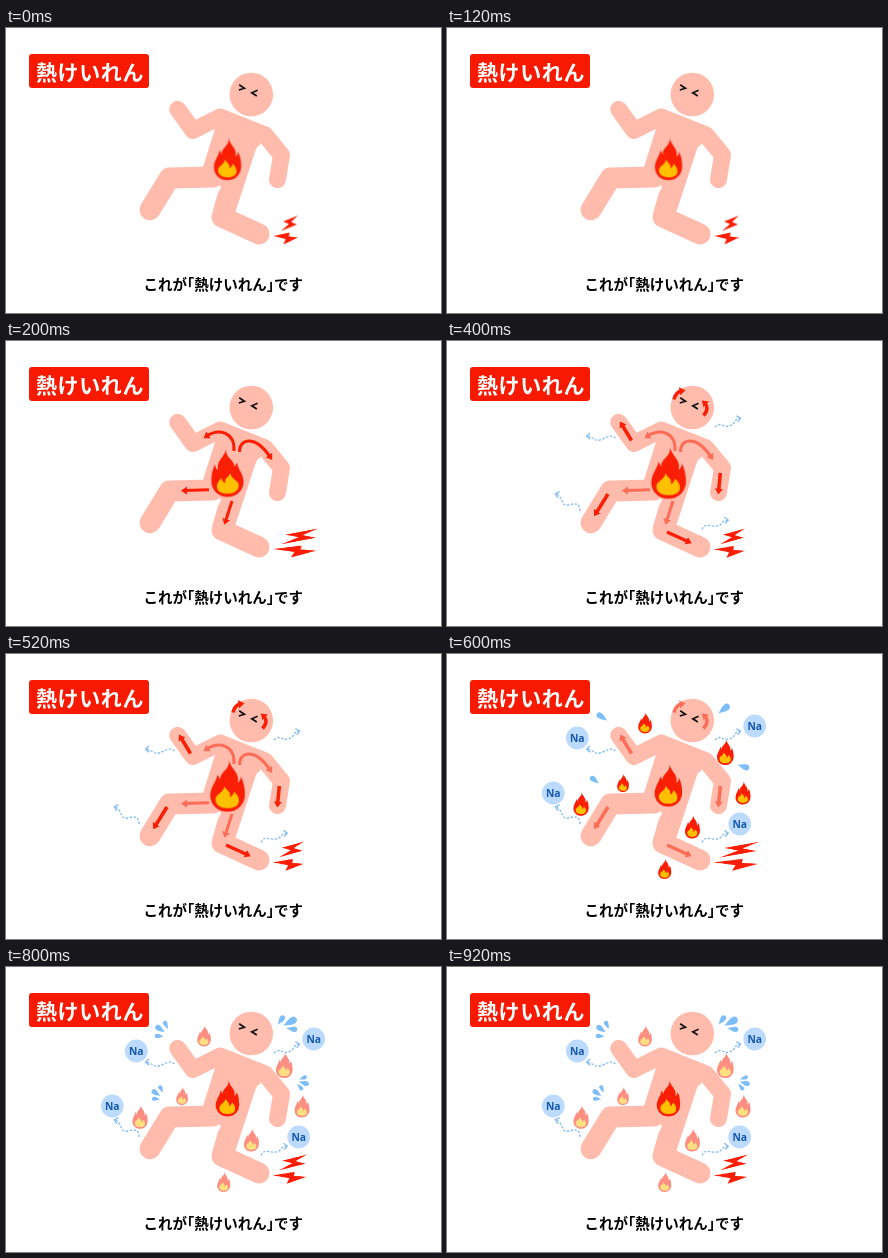
An HTML page that plays this animation: 435x285 px, repeating every 1000 ms.

```html
<!DOCTYPE html>
<html lang="ja">
<head>
<meta charset="utf-8">
<title>熱けいれん</title>
<style>
  html, body { margin: 0; width: 100%; height: 100%; overflow: hidden; background: #fff; }
  svg { display: block; width: 435px; height: 285px; }
  text { font-family: "Noto Sans CJK JP", "Noto Sans CJK", sans-serif; font-weight: 700; }
  .na text { font: 700 10.3px "Noto Sans", "Open Sans", sans-serif; fill: #1457ad; text-anchor: middle; }
  .caption { font-size: 14.5px; font-feature-settings: "halt"; }
  .skin { fill: none; stroke: #ffbcac; stroke-linecap: round; stroke-linejoin: round; }
  .arrows { fill: none; stroke: #fa1e05; stroke-width: 3; }
  .waves { fill: none; stroke: #85bcf3; stroke-width: 1.3; }
  .waves path { stroke-dasharray: 2.4 1.5; }
  .bolt { fill: #fa1e05; }
  .drops { fill: #7dbdfa; }

  .core, .limbs, .waves, .sodium, .sparks, .one, .three, .heart, .bolt {
    animation: 1s step-end infinite;
  }
  .core { animation-name: core; }
  .limbs { animation-name: limbs; }
  .waves { animation-name: waves; }
  .sodium { animation-name: sodium; }
  .sparks { animation-name: sparks; }
  .one { animation-name: one; }
  .three { animation-name: three; }
  .heart { animation-name: heart; }
  .top { animation-name: top; }
  .low { animation-name: low; }

  @keyframes core { 0%, 60%, 100% { opacity: 0 } 20% { opacity: 1 } 40% { opacity: .5 } }
  @keyframes limbs { 0%, 80%, 100% { opacity: 0 } 40% { opacity: 1 } 60% { opacity: .5 } }
  @keyframes waves { 0%, 100% { opacity: 0 } 40% { opacity: 1 } }
  @keyframes sodium { 0%, 100% { opacity: 0 } 60% { opacity: 1 } }
  @keyframes sparks { 0%, 100% { opacity: 0 } 60% { opacity: 1 } 80% { opacity: .5 } }
  @keyframes one { 0%, 80%, 100% { opacity: 0 } 60% { opacity: 1 } }
  @keyframes three { 0%, 100% { opacity: 0 } 80% { opacity: 1 } }
  @keyframes heart {
    0%, 100% { transform: translate(221.5px, 131.3px) scale(1) }
    20% { transform: translate(221.5px, 132px) scale(-1.18, 1.14) }
    40% { transform: translate(221.5px, 132px) scale(1.27, 1.23) }
    60% { transform: translate(221.3px, 131.5px) scale(1.01) }
    80% { transform: translate(221.5px, 131.5px) scale(.86) }
  }
  @keyframes top {
    0%, 100% { transform: translate(275px, 187.5px) }
    20% { transform: translate(275px, 187.5px) scale(2.18, 1.02) }
    40% { transform: translate(273px, 187.5px) scale(1.47, 1.02) }
    60% { transform: translate(272.5px, 187.8px) scale(2.32, 1.02) }
    80% { transform: translate(273px, 187.5px) scale(1.65, 1.02) }
  }
  @keyframes low {
    0%, 100% { transform: translate(267.5px, 204px) }
    20% { transform: translate(267px, 204px) scale(1.78, 1) }
    40% { transform: translate(267px, 204.3px) scale(1.25, 1) }
    60% { transform: translate(267px, 204.3px) scale(1.8, 1) }
    80% { transform: translate(267px, 204.3px) scale(1.36, 1) }
  }
</style>
</head>
<body>
<svg viewBox="0 0 435 285">
  <defs>
    <marker id="head" markerUnits="userSpaceOnUse" markerWidth="10" markerHeight="10"
            viewBox="0 -5 10 10" refX="3" orient="auto">
      <path d="M0 -4L6 0L0 4Z" fill="#fa1e05" stroke="none"/>
    </marker>
    <marker id="tip" markerUnits="userSpaceOnUse" markerWidth="8" markerHeight="8"
            viewBox="-6 -4 8 8" refX="0" orient="auto">
      <path d="M-3.6 -3.2L0 0L-3.6 3.2" fill="none" stroke="#85bcf3" stroke-width="1.3"
            style="stroke-dasharray:none"/>
    </marker>
    <g id="flame">
      <path fill="#fa1e05" d="M1 -21.5C3 -13 10 -11 8 -2.5C9.8 -4 10.6 -6 10.3 -8C13 -3 13.7 2 13.7 7C13.7 15 8 21 0 21C-8 21 -13.6 15 -13.6 8C-13.6 1 -9 -3 -8 -9C-6.6 -7.5 -6 -5.5 -5.8 -3.5C-7 -12 2.5 -13 1 -21.5Z"/>
      <path fill="#ffc000" d="M-2.5 0C-1 4 3 4 1.8 9C3.8 8 4.8 6.5 5 4.5C7.5 6.5 9 9 9 12C9 16 5 18 0 18C-6 18 -9.5 15 -9.5 11C-9.5 6 -3 6 -2.5 0Z"/>
    </g>
    <path id="drop" d="M-7 0C-3 -1.5 0 -3.3 3.2 -3.3C5.5 -3.3 6.6 -1.8 6.6 0C6.6 1.8 5.5 3.3 3.2 3.3C0 3.3 -3 1.5 -7 0Z"/>
  </defs>

  <rect x="23" y="26" width="120" height="34" rx="3" fill="#f81a00"/>
  <text x="30" y="51.5" font-size="21" letter-spacing=".6" fill="#fff">熱けいれん</text>
  <text class="caption" x="137.5" y="262">これが「熱けいれん」です</text>

  <circle cx="245.3" cy="66.5" r="21.8" fill="#ffbcac"/>
  <path class="skin" stroke-width="17" d="M171.7 81.3L187 102.5L214 89L259 107L275.5 127L271.5 151.5"/>
  <path class="skin" stroke-width="21" d="M207 149L163.5 150L144 181.7M222 168L216 189L253 206"/>
  <path fill="#ffbcac" d="M212 91L257 105L254 117Q251 118 250 121L229 185L206 187L215 159L197 139L208 104Z"/>
  <path fill="none" stroke="#111" stroke-width="1.7" d="M233.2 56.8L238.4 60.2L232.8 62M251.6 62.3L245.8 64.8L250.8 68"/>

  <g class="arrows core" marker-end="url(#head)">
    <path marker-end="url(#head)" d="M228 110C229 91 213 87 200 95.5"/>
    <path marker-end="url(#head)" d="M233.5 111C233 98 249 93 264.5 116.5"/>
    <path marker-end="url(#head)" d="M203 148.7L178 149.6"/>
    <path marker-end="url(#head)" d="M226 160L219.3 181"/>
  </g>
  <g class="arrows limbs" style="stroke-width:3.5px">
    <path marker-end="url(#head)" d="M184.5 99.5L174.5 83"/>
    <path marker-end="url(#head)" d="M273.3 132L271.6 150.5"/>
    <path marker-end="url(#head)" d="M161 153L148.7 172.7"/>
    <path marker-end="url(#head)" d="M220 191L242 201"/>
    <path marker-end="url(#head)" d="M227 58.5C228 53 231 50.5 235.5 49.8"/>
    <path marker-end="url(#head)" d="M256.5 74.5C261 69.5 261 65 257 61.5"/>
  </g>

  <g class="waves">
    <path marker-end="url(#tip)" d="M168.5 97C163 92 158 98 153 99C147 100.5 146 95 139.5 95.3"/>
    <path marker-end="url(#tip)" d="M133 170C133 162 128 162 122 164C113 166 117 155 108.3 152.8"/>
    <path marker-end="url(#tip)" d="M268 86C274 80 276 87 282 85C290 83 285 79 293.5 77"/>
    <path marker-end="url(#tip)" d="M255 188.5C258 181 264 186 270 185C277 183.5 273 180 281.3 179"/>
  </g>

  <g class="sodium na" id="ions"></g>
  <g class="sparks" id="fires"></g>
  <g class="drops one" id="few"></g>
  <g class="drops three" id="many"></g>

  <polygon class="bolt top" points="17,0 2,6 8,8.5 0,15.5 16,9 10,6.5"/>
  <polygon class="bolt low" points="0,4 12,7 10,12.5 24.5,5.5 15.5,4.5 16,.5"/>
  <g class="heart"><use href="#flame"/></g>
</svg>
<script>
  const fill = (id, items, draw) => {
    document.getElementById(id).innerHTML = items.map(draw).join('');
  };
  const use = ref => ([x, y, size, turn = 0]) =>
    `<use href="#${ref}" transform="translate(${x} ${y}) rotate(${turn}) scale(${size})"/>`;

  fill('ions', [[130.3, 84], [106.3, 139], [307.7, 72], [292.7, 170]], ([x, y]) =>
    `<circle cx="${x}" cy="${y}" r="11.4" fill="#bbdafd"/><text x="${x}" y="${y + 3.7}">Na</text>`);

  // x, y, size
  fill('fires', [
    [198, 69, .5], [134, 150, .56], [176, 129, .43], [278.3, 98.3, .61],
    [296, 139, .55], [245.4, 173, .55], [217.7, 215, .48]
  ], use('flame'));

  // x, y, size, angle
  fill('few', [
    [277, 55, 1, -38], [155, 63, .9, 215], [147.5, 126, .8, 218], [296.5, 112.5, .9, 18]
  ], use('drop'));
  fill('many', [
    [275, 53, .8, -55], [284, 55, 1.1, -28], [286, 62, .8, 8],
    [160, 58, .65, 245], [154, 62, .8, 215], [153, 69, .65, 185],
    [155, 122, .6, 245], [150, 126, .75, 215], [150, 132, .6, 185],
    [297, 111, .6, -20], [298, 116, .75, 15], [294, 120, .6, 50]
  ], use('drop'));
</script>
</body>
</html>
```
